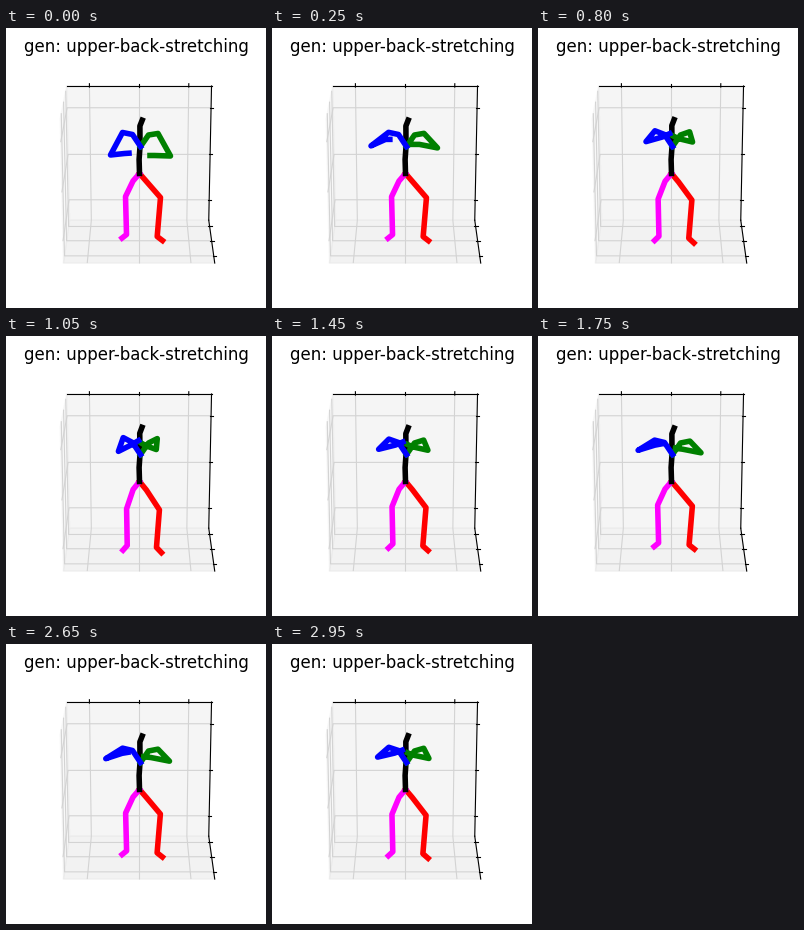
A matplotlib script that plays this animation: 260 px wide and 280 px high, repeating every 3000 ms.

```python
import numpy as np
import matplotlib.pyplot as plt
from matplotlib.animation import FuncAnimation
from matplotlib.collections import LineCollection
from matplotlib.patches import Polygon

W, H, DPI = 260, 280, 100
FRAMES, STEP = 60, 50

fig = plt.figure(figsize=(W / DPI, H / DPI), dpi=DPI, facecolor="white")
ax = fig.add_axes([0, 0, 1, 1])
ax.set_xlim(0, W)
ax.set_ylim(H, 0)
ax.axis("off")
fig.text(0.5, 1 - 24 / H, "gen: upper-back-stretching", ha="center",
         va="baseline", fontsize=12, color="black")

# Perspective room, seen from 20 degrees above the front
LIM = 0.7 * 25 / 24
TICKS = (-0.5, 0, 0.5)
TILT = np.radians(20)


def project(x, y, z):
    x, y, z = 0.8164 * x, 0.8164 * y, 0.6123 * z
    c, s = np.cos(TILT), np.sin(TILT)
    scale = 1243 / (10 - s * y - c * z)
    return 133.1 + x * scale, 144.6 - (c * y - s * z) * scale


def path(*points):
    return [project(*p) for p in points]


def black(*points):
    ax.plot(*zip(*path(*points)), color="black", lw=0.8, zorder=1)


def draw_room():
    a, b = -LIM, LIM
    panes = [
        (0.95, path((a, a, a), (a, b, a), (a, b, b), (a, a, b))),
        (0.90, path((a, a, a), (b, a, a), (b, a, b), (a, a, b))),
        (0.925, path((a, a, a), (b, a, a), (b, b, a), (a, b, a))),
    ]
    for grey, corners in panes:
        ax.add_patch(Polygon(corners, color=(grey,) * 3, alpha=0.5, lw=1, zorder=0))

    grid = []
    for t in TICKS:
        grid.append(path((t, b, a), (t, a, a), (t, a, b)))
        grid.append(path((a, t, b), (a, t, a), (b, t, a)))
        grid.append(path((b, a, t), (a, a, t), (a, b, t)))
    ax.add_collection(LineCollection(grid, colors="lightgray", linewidths=0.8, zorder=0.5))

    black((a, b, a), (b, b, a))
    black((b, a, a), (b, b, a))
    black((b, a, a), (b, a, b))
    inner, outer = b - 0.0117, b + 0.0233
    for t in TICKS:
        black((t, inner, a), (t, outer, a))
        black((inner, t, a), (outer, t, a))
        black((inner, a, t), (outer, a, t))


draw_room()

# Chains of joints at rest
REST = {
    "red": [(133, 145), (140, 153), (154, 169), (150.7, 208), (156, 212)],
    "magenta": [(133, 145), (126.5, 152.5), (119, 168), (120, 206), (115.5, 209.5)],
    "black": [(133, 145), (132.6, 131), (133.5, 118), (133.4, 97.5), (135.7, 91.7)],
    "green": [(134, 118), (142, 106.5), (151.5, 105)],
    "blue": [(134, 118), (126, 106), (116, 104)],
}
# Vertical shift along each chain at full lean, and which way is inward
LEG, SPINE, SHOULDER = (0, 0.5, 4.5, 3, 4.3), (0, 0, 0, -0.7, -0.9), (0, 0, -3)
SHIFT = {"red": (LEG, -1), "magenta": (LEG, 1), "black": (SPINE, -1),
         "green": (SHOULDER, -1), "blue": (SHOULDER, 1)}

# Elbow, wrist and hand: folded, half open, open, lowered
ARMS = {
    "green": [[(149.5, 113), (160, 115), (165, 119.5), (164, 127.5)],
              [(139, 109), (142, 111.5), (147, 116), (148, 127)],
              [(134, 106), (136, 110), (139, 116), (143.5, 127)]],
    "blue": [[(112.2, 115), (101.7, 112.7), (98.5, 117.5), (104, 126.5)],
             [(125.5, 108), (119, 108.5), (113, 111), (118, 125)],
             [(132, 104), (126, 106.5), (117.3, 111), (122.5, 124.7)]],
}
CURVES = {c: [np.polyfit(range(4), p, 3) for p in arms] for c, arms in ARMS.items()}


def opening(t):
    """Arm opening: 0 folded, 2 open, 3 lowered."""
    if t < 1100:
        return 3 * (1 - t / 1100) ** 1.6
    if t < 2150:
        return 1 - np.cos(np.pi * (t - 1100) / 1050)
    return 2 - 1.4 * ((t - 2150) / 800) ** 2


limbs = {c: ax.plot([], [], color=c, lw=4, zorder=2)[0] for c in REST}


def update(frame):
    p = opening(frame * STEP)
    lean = np.exp(-1.5 * p)
    powers = p ** np.arange(3, -1, -1)
    for color, line in limbs.items():
        shift, inward = SHIFT[color]
        dy = lean * np.array(shift)
        joints = np.array(REST[color]) + np.column_stack([0.25 * inward * abs(dy), dy])
        arm = [powers @ curve for curve in CURVES.get(color, [])]
        # joints sit on pixel centres
        line.set_data(*(np.vstack([joints, *arm]) + 0.5).T)
    return list(limbs.values())


anim = FuncAnimation(fig, update, frames=FRAMES, interval=STEP,
                     repeat=True, repeat_delay=0, blit=False)
plt.show()
```
